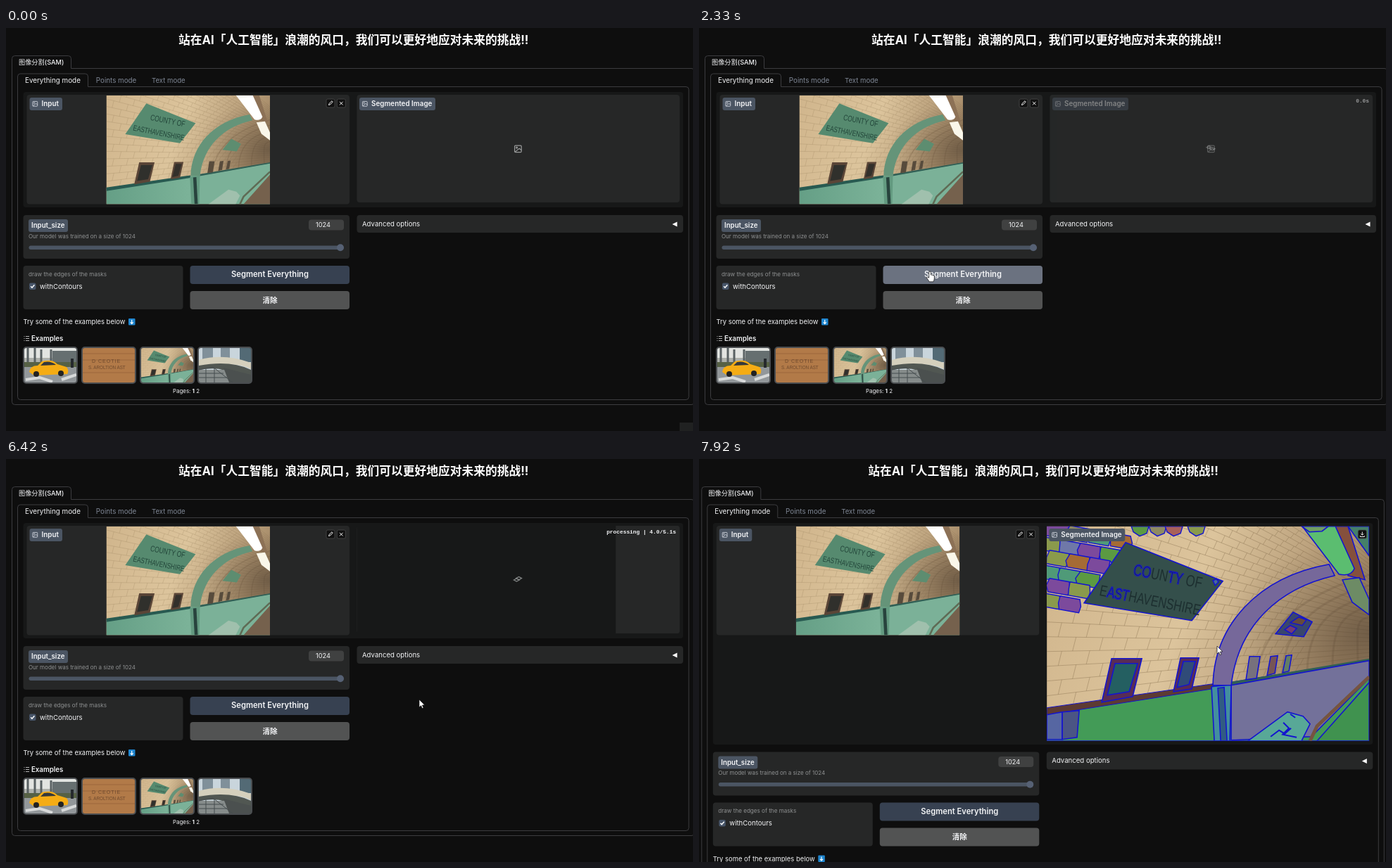
These frames come from a looping animation (976x573 px, 7990 ms). An HTML page:

```html
<!DOCTYPE html>
<html lang="zh">
<head>
<meta charset="utf-8">
<style>
html, body { margin: 0; width: 100%; height: 100%; overflow: hidden; background: #0e0e0e; }
#stage { display: block; width: 976px; height: 573px; }
text { font-family: Inter, "Noto Sans CJK SC", "Noto Sans CJK", sans-serif; white-space: pre; }
.mono { font-family: "Liberation Mono", monospace; }
.sign { font-family: "Liberation Sans", sans-serif; }
</style>
</head>
<body>
<svg id="stage" viewBox="0 0 976 573"></svg>
<script>
const LOOP = 7990, RUN = 2330, QUEUED = 3450, WORKING = 5040, DONE = 6560;
const BLOCK = '#262727', PIT = '#171818', SLATE = '#4b5563', INK = '#f3f4f6', MASK = '#1414cf';

const rect = (x, y, w, h, fill, r = 0, more = '') =>
  `<rect x="${x}" y="${y}" width="${w}" height="${h}" rx="${r}" fill="${fill}" ${more}/>`;
const path = (d, fill = 'none', stroke = 'none', width = 1, more = '') =>
  `<path d="${d}" fill="${fill}" stroke="${stroke}" stroke-width="${width}" ${more}/>`;
const text = (x, y, s, size, fill = INK, weight = 400, more = '') =>
  `<text x="${x}" y="${y}" font-size="${size}" fill="${fill}" font-weight="${weight}" ${more}>${s}</text>`;
const group = (id, body, more = '') => `<g id="${id}" ${more}>${body}</g>`;
const photo = (x, y, w, h, vw, vh, body) =>
  `<svg x="${x}" y="${y}" width="${w}" height="${h}" viewBox="0 0 ${vw} ${vh}" preserveAspectRatio="xMidYMid slice">${body}</svg>`;

function random(seed) {
  return () => (seed = (seed * 16807) % 2147483647) / 2147483647;
}

// Brick courses converging towards the far end of the tunnel.
function bricks() {
  const at = (y, x) => y + (190 + (y - 262) * 0.25 - y) * x / 458;
  let d = '';
  for (let i = 0; i < 30; i++) {
    const y = 241 - i * 21;
    d += `M0 ${y}L458 ${at(y, 458).toFixed(1)}`;
    for (let k = 0; k < 15; k++) {
      const x = 520 * (1 - 0.92 ** (k + (i % 2) / 2));
      d += `M${x.toFixed(1)} ${at(y, x).toFixed(1)}L${(x - 5).toFixed(1)} ${at(y + 21, x - 5).toFixed(1)}`;
    }
  }
  return path(d, 'none', '#77603f', 0.7, 'opacity=".5"');
}

// Vault ribs beyond the arch.
function ribs() {
  let d = '';
  for (let k = 1; k < 6; k++)
    d += `M${262 + k * 36} ${222 - k * 6}C${270 + k * 34} ${150 - k * 2} ${340 + k * 20} ${88 + k * 9} 458 ${54 + k * 15}`;
  return path(d, 'none', '#5f4a33', 3, 'opacity=".22"');
}

// Masked tiles packed edge to edge in the upper left.
function mosaic() {
  const rnd = random(77), wob = () => (rnd() * 5 - 2.5).toFixed(1);
  const hues = ['#8a9a4c', '#7c4a9c', '#4f9a78', '#a8605a', '#6f78a8', '#5b9a42', '#8f8a62', '#a56b35'];
  const hue = () => hues[Math.floor(rnd() * 8)];
  let out = '';
  for (let r = 0; r < 6; r++)
    for (let c = 0; c < 5; c++) {
      const x = c * 29 - (r % 2) * 14, y = r * 20 - 6 + c * 5;
      if (x < 102 - y * 0.75)
        out += path(`M${x + 4} ${y}l28 5 ${wob()} 10-3 9-28-5 ${wob()}-9Z`, hue(), MASK, 1.4);
    }
  for (const x of [120, 145, 168, 200])
    out += path(`M${x} 0H${x + 25}L${x + 22} 10L${x + 12} 14L${x + 3} 8Z`, hue(), MASK, 1.4);
  return out;
}

function tunnel(seg) {
  const shape = (d, plain, mask) => path(d, seg ? mask : plain, seg ? MASK : 'none', 1.6);
  const ink = seg ? '#1d2f30' : '#23463a';
  const lit = s => seg ? `<tspan stroke="${MASK}" stroke-width=".9">${s}</tspan>` : s;
  const line = (x, y, s, size) =>
    `<text class="sign" transform="matrix(1 .2 -.28 1.35 ${x} ${y})" font-size="${size}" fill="${ink}">${s}</text>`;
  return rect(0, 0, 458, 305, 'url(#wall)') + bricks() + ribs() + rect(0, 0, 458, 305, 'url(#far)')
    + (seg ? mosaic() : '')
    + shape('M112 23L250 78L206 134L53 109Z', '#568a6f', '#344f4b')
    + line(122, 69, lit('CO') + 'UN' + lit('TY') + ' OF', 16.5) + line(74, 98, 'E' + lit('AST') + 'HAVENSHIRE', 15.8)
    + shape('M0 262L236 226L458 190V305H0Z', 'url(#mint)', '#439b57')
    + path('M0 258L236 224V231L0 268Z', seg ? '#5d3a33' : '#285a51', seg ? MASK : 'none')
    + path('M262 221L458 188V192L262 227Z', '#315f55')
    + shape('M262 226L458 191V216L376 299L262 304Z', '#7bb198', '#73719a')
    + shape('M384 305L458 222V305Z', '#75614d', '#40924f')
    + path('M374 305L384 284L458 214', 'none', seg ? '#765440' : '#5f6b55', 5)
    + shape('M286 305L342 264L364 270L374 281L362 305Z', '#a0c0ad', '#58a897')
    + (seg ? path('M318 299l12-9 8 5 9-8M336 279l8 8-9 9 20 4M346 267l7 5', 'none', MASK, 2)
      + shape('M0 268L22 264V303H0Z', '', '#5666a2') + shape('M22 264L46 262L43 300L22 303Z', '', '#4b5584') : '')
    + shape('M234 228L262 225L260 305H238Z', '#639a80', '#438f9e')
    + shape('M243 230L252 229L256 305H247Z', '#28433d', '#315c83')
    + shape('M236 226C238 140 300 72 401 54L409 70C330 88 272 140 262 226Z', '#659479', '#76689a')
    + shape('M92 188L135 188L122 242L78 250Z', '#5a4537', '#582c55')
    + shape('M97 195L129 195L117 235L86 240Z', '#30302c', '#245f61')
    + shape('M190 187L216 187L206 231L180 235Z', '#5a4537', '#582c55')
    + shape('M194 192L211 192L202 225L185 229Z', '#33302b', '#304b78')
    + shape('M288 185L303 185L298 216L283 218Z', '#574b3c', '#77717d')
    + shape('M318 185L328 184L324 209L313 212Z', '#574b3c', '#765456')
    + shape('M340 184L348 183L344 206L335 208Z', '#574b3c', '#627d67')
    + shape('M350 122L377 136L365 157L325 153Z', '#5d8d70', '#39466d')
    + (seg ? shape('M346 137L358 129L369 133L363 141Z', '', '#654a3c') + shape('M338 147l8-6 9 4-7 8Z', '', '#753d70')
      + shape('M236 77l5-2 3 4-5 5Z', '', '#486a98') : '')
    + shape('M398 0H428L452 76L428 70Z', '#8c7156', '#85503d')
    + shape('M363 0H410L437 60Q432 72 415 68Z', '#ffffff', '#5bbd70')
    + shape('M362 0H400L391 7L373 8Z', '#fbfaf3', '#709e62')
    + shape('M420 76L444 73L458 104V126L434 108Z', '#faf7ea', '#6d8b65')
    + (seg ? shape('M428 0H458V42Z', '', '#458069') : '');
}

const car = rect(0, 0, 74, 49, '#aeb1ac') + rect(0, 0, 74, 14, '#e2e4e1')
  + path('M5 0V21M15 0V21M24 2V20M38 2V20', 'none', '#596163', 3) + rect(40, 4, 34, 17, '#666f70')
  + rect(0, 20, 74, 7, '#566145') + rect(0, 27, 74, 22, '#92979a')
  + path('M2 45L22 42L40 48M53 45L74 38', 'none', '#d7d9d9', 4)
  + path('M7 34Q8 25 19 25L25 19Q40 15 47 23L60 27Q64 32 61 37L14 39Z', '#f5ac14')
  + path('M23 25L28 20Q38 18 45 24Z', '#34383b')
  + '<circle cx="17" cy="37" r="4" fill="#222"/><circle cx="52" cy="36" r="4" fill="#222"/>'
  + path('M68 15V28', 'none', '#25292d', 4);
const board = rect(0, 0, 74, 49, '#b27a48') + path('M0 8H74M0 17H74M0 35H74', 'none', '#9b673c', 1)
  + text(13, 21, 'D CEOTIE', 7, '#704a2e', 400, 'class="sign" letter-spacing="1"')
  + text(8, 30, 'S. AROLTION AST', 6.3, '#704a2e', 400, 'class="sign"');
const bridge = rect(0, 0, 74, 49, '#c9d5dc') + path('M5 0H20V23H5ZM31 0H44V18H31Z', '#80909a')
  + path('M58 0H74V20H58Z', '#536a75') + path('M0 17Q35 7 74 21V30Q55 18 0 27Z', '#d5d0bd')
  + path('M0 25Q45 17 74 31V39H48Q35 25 0 31Z', '#515752') + rect(0, 31, 43, 18, '#868c8b')
  + path('M35 28L74 38V49H43Z', '#4b504f') + path('M0 31L20 27L48 49M0 36H35M0 42H40M10 30V49M22 29V49', 'none', '#454c4e', 1);

const imageIcon = (x, y, s, color) =>
  `<g transform="translate(${x} ${y}) scale(${s})" fill="none" stroke="${color}"><rect x=".5" y=".5" width="8" height="8" rx="1"/><circle cx="3" cy="3" r=".8"/><path d="M1 8L6 4L8.5 6"/></g>`;
const label = (x, w, s) => rect(x, 99, w, 18, SLATE, 3) + imageIcon(x + 4, 104, 0.85, '#d6dae2') + text(x + 17, 111.4, s, 9.9, INK, 600);
const tool = (x, d) => rect(x, 101, 12, 12, '#101010', 2, 'stroke="#4a4a4a" stroke-width=".8"') + path(d, 'none', '#eee', 1);
const frame = (l, top, tab, y, r, b) => path(
  `M${tab} ${y}H${r - 4}q4 0 4 4V${b - 4}q0 4-4 4H${l + 4}q-4 0-4-4V${top + 4}q0-4 4-4H${tab - 4}q4 0 4 4V${y}`, 'none', '#3c3c3f', 1);
const middle = 'text-anchor="middle"';

const thumbs = [car, board, tunnel(false), bridge].map((art, i) => {
  const x = [25, 108, 191, 273][i], t = i === 2;
  return photo(x + 1, 455, 74, 49, t ? 458 : 74, t ? 305 : 49, art)
    + rect(x, 454, 76, 51, 'none', 4, 'stroke="#4a4d50" stroke-width="2"');
}).join('');

const lower =
  rect(498.5, 266, 463.5, 25, BLOCK, 4) + text(506, 281.6, 'Advanced options', 9.6) + path('M946.5 279L953.5 275.5V282.5Z', '#fff')
  + rect(24.5, 266, 463.5, 62, BLOCK, 4) + rect(32, 272, 56, 18, SLATE, 3) + text(36, 284.3, 'Input_size', 9.7, INK, 600)
  + rect(430, 272.5, 50, 15, '#404141', 4) + text(440, 283.4, '1024', 9.2)
  + text(32, 298.8, 'Our model was trained on a size of 1024', 8, '#8f9192')
  + rect(32.5, 309.5, 447, 5.5, SLATE, 2.7) + '<circle cx="475" cy="312.3" r="5" fill="#566174"/>'
  + rect(24.5, 338, 227, 62, BLOCK, 4) + text(32, 352.6, 'draw the edges of the masks', 8.1, '#8f9192')
  + rect(33, 362.5, 9.5, 9.5, '#475569', 2) + path('M35.2 367.3L37 369.2L40.4 365.3', 'none', '#fff', 1.5)
  + text(48, 370.6, 'withContours', 9.6)
  + rect(261.5, 338, 226.5, 26, '#374151', 4, 'id="go"') + text(375, 354.4, 'Segment Everything', 11.2, INK, 600, middle)
  + rect(261.5, 374, 226.5, 26, '#525353', 4) + text(375, 390.8, '清除', 10.6, INK, 700, middle)
  + text(24.5, 421, 'Try some of the examples below', 9.45)
  + rect(174, 413, 9.5, 9.5, '#1f86cf', 1) + path('M178.7 415V420M176.7 418.3L178.7 420.5L180.7 418.3', 'none', '#fff', 1.2)
  + path('M25.5 438.5h1M25.5 441.5h1M25.5 444.5h1M28 438.5h5M28 441.5h5M28 444.5h5', 'none', '#c9c9c9', 0.9)
  + text(36, 444.6, 'Examples', 9.7, INK, 600) + thumbs
  + text(237, 518.8, 'Pages: <tspan font-weight="700">1</tspan> 2', 7.9);

// Thin diamond ring used twice by the loading mark.
const ring = id => path('M-4 0L0-2.1L4 0L0 2.1Z', 'none', '#858888', 1.2, `id="${id}"`);

const stage = document.getElementById('stage');
stage.innerHTML = `<defs>
<linearGradient id="wall" x2="1" y2=".25"><stop stop-color="#d0b58c"/><stop offset=".5" stop-color="#dcc49c"/><stop offset="1" stop-color="#a58a68"/></linearGradient>
<linearGradient id="mint" x2="1"><stop stop-color="#659f86"/><stop offset=".5" stop-color="#7bb298"/></linearGradient>
<radialGradient id="far" cx="1" cy=".5" r=".45"><stop stop-color="#4e4032" stop-opacity=".6"/><stop offset="1" stop-color="#6b5740" stop-opacity="0"/></radialGradient>
</defs>` + rect(0, 0, 976, 573, '#0e0e0e') + group('page',
  text(245, 23, '站在AI「人工智能」浪潮的风口\uff0c我们可以更好地应对未来的挑战!!', 16.75, '#fff', 700)
  + group('short', frame(8.5, 39.5, 92.5, 57.5, 978, 535.5) + frame(16.5, 65, 116.5, 83.5, 970, 528.5))
  + group('tall', frame(8.5, 39.5, 92.5, 57.5, 978, 685.5) + frame(16.5, 65, 116.5, 83.5, 970, 678.5))
  + text(18, 51.7, '图像分割(SAM)', 9.2, INK, 500)
  + text(27, 77.5, 'Everything mode', 9.85) + text(127.8, 77.5, 'Points mode', 9.8, '#7f8795') + text(207, 77.5, 'Text mode', 9.6, '#7f8795')
  + rect(24.5, 91, 937.5, 164, PIT, 4, 'id="row"')
  + rect(29.5, 95, 458.5, 155.5, BLOCK, 4)
  + photo(142.5, 95.7, 232.5, 154.8, 458, 305, tunnel(false)) + label(33.5, 46.5, 'Input')
  + tool(455, 'M458.5 109.5L459 107.5L463 103.7L464.3 105L460.4 109Z') + tool(470.3, 'M474 104.8L478.6 109.4M478.6 104.8L474 109.4')
  + group('empty', rect(498.5, 95, 458.5, 153, BLOCK, 4) + imageIcon(722, 166.5, 1.2, '#9a9c9c'))
  + group('result', photo(498.8, 95.7, 458, 305, 458, 305, tunnel(true)))
  + label(502, 108, 'Segmented Image')
  + group('save', tool(941, 'M947 103.5V108M945 106.3L947 108.3L949 106.3M944 109V110.5H950V109'))
  + group('cover', rect(498.5, 95, 458.5, 153, BLOCK, 4) + rect(498.5, 95, 0, 153, PIT, 0, 'id="bar"')
    + ring('top') + ring('bottom')
    + text(952, 106.3, '', 7.85, INK, 700, 'id="clock" class="mono" text-anchor="end"'))
  + rect(498.5, 95, 459, 306, PIT, 0, 'id="veil" opacity=".18"')
  + group('low', lower))
  + rect(957, 561, 19, 12, '#202121', 0, 'id="corner"')
  + group('cursor',
    path('M0 0V11L2.6 8.7L4.3 12.6L6.1 11.8L4.4 8.1L7.8 7.8Z', '#fff', '#111', 0.7, 'id="arrow"')
    + path('M-1.3 1.3Q-1.3 0 0 0T1.3 1.3V5Q4.6 4.7 6.3 6.5V10Q6.2 12 5 14.8H-.8Q-3 11.3-4.7 8.8Q-4.4 7-1.3 9.2Z', '#fff', '#111', 0.7, 'id="hand"'));

const el = {};
stage.querySelectorAll('[id]').forEach(n => el[n.id] = n);
const set = (n, k, v) => el[n].setAttribute(k, v);
const show = (n, on) => set(n, 'visibility', on ? 'visible' : 'hidden');
const clamp = v => Math.min(1, Math.max(0, v));

// Pointer stops: time, x, y.
const stops = [
  [70, 962, 562], [450, 420, 300], [810, 92, 70], [950, 42, 66], [1090, 86, 71], [1350, 150, 190],
  [1640, 300, 356], [2100, 328, 346], [2460, 328, 346], [2700, 400, 326], [3000, 500, 345],
  [3310, 530, 350], [3590, 528, 362], [4400, 530, 362], [4700, 584, 347], [5040, 587, 342],
  [7200, 587, 342], [7390, 540, 290], [7600, 640, 190], [7750, 785, 146], [7920, 736, 266]];

function pointer(t) {
  const i = stops.findIndex(s => s[0] > t);
  if (i === 0) return stops[0].slice(1);
  if (i < 0) return stops[stops.length - 1].slice(1);
  const [a, b] = [stops[i - 1], stops[i]], k = (t - a[0]) / (b[0] - a[0]);
  return [a[1] + (b[1] - a[1]) * k, a[2] + (b[2] - a[2]) * k];
}

const poses = [[2.2, 2.4], [-2.2, 2.4], [-2.2, 0], [2.2, 0]];
function spin(t) {
  const age = t - 2060, n = Math.max(0, Math.floor(age / 830)), x = (age - n * 830) / 60;
  const k = 1 - Math.exp(-x) * (1 + x), from = poses[(n + 3) % 4], to = poses[n % 4];
  const dx = from[0] + (to[0] - from[0]) * k, dy = from[1] + (to[1] - from[1]) * k;
  set('top', 'transform', `translate(${727 + dx} ${169.6 + dy})`);
  set('bottom', 'transform', `translate(${727 - dx} ${172 - dy})`);
}

function draw(t) {
  const done = t >= DONE, busy = t >= RUN - 70 && !done;
  set('page', 'transform', `translate(${done ? -4.7 : 0} 0)`);
  set('low', 'transform', `translate(0 ${done ? 150.5 : 0})`);
  set('row', 'height', done ? 315 : 164);
  show('short', !done);
  show('tall', done);
  show('empty', !done);
  show('result', done);
  show('save', done);
  show('veil', done && t < DONE + 60);
  show('cover', busy);
  if (busy) {
    const s = Math.max(0, t - RUN) / 1000, tick = (Math.floor(s * 10 + 1e-6) / 10).toFixed(1);
    set('cover', 'opacity', clamp((t - RUN + 70) / 130));
    set('bar', 'width', t < QUEUED ? 0 : 458.5 * s / 5.1);
    el.clock.textContent = t < QUEUED ? tick + 's' : (t < WORKING ? 'queue: 1/1' : 'processing') + ` | ${tick}/5.1s`;
    spin(t);
  }
  const [x, y] = pointer(t);
  const onGo = !done && x > 261 && x < 488 && y > 338 && y < 364;
  const hand = onGo || (y < 84 && x < 260);
  set('go', 'fill', onGo && t >= 1700 ? '#6b7280' : '#374151');
  set('cursor', 'transform', `translate(${x} ${y})`);
  show('hand', t >= 70 && hand);
  show('arrow', t >= 70 && !hand);
  show('corner', t < 70);
}

const start = performance.now();
(function tick() {
  draw((performance.now() - start) % LOOP);
  requestAnimationFrame(tick);
})();
</script>
</body>
</html>
```
